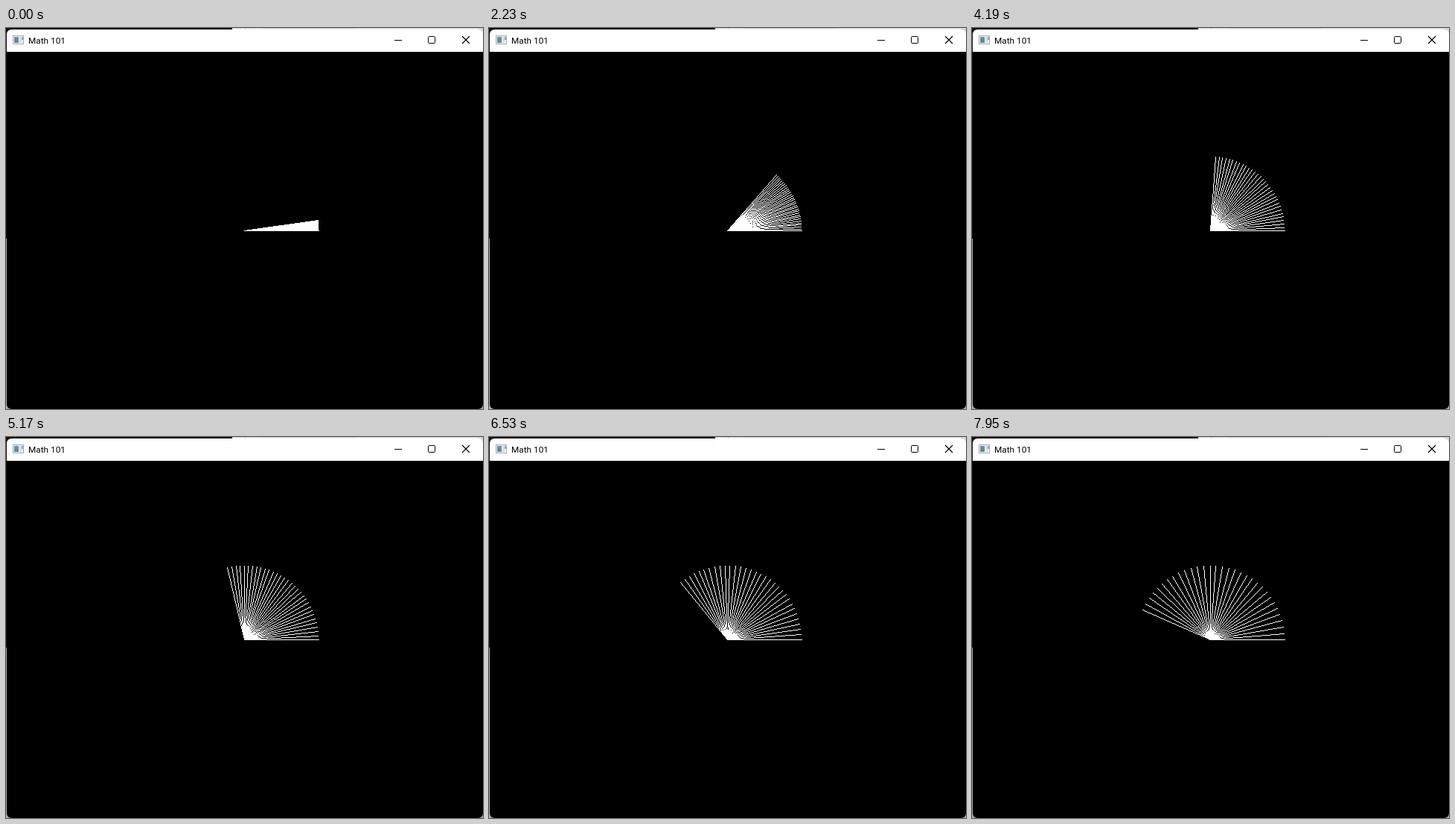
Recreate the animation shown at these times as an HTML page with a canvas. Size 641 px wide and 512 px high, loop 8000 ms.

```html
<!DOCTYPE html>
<html lang="en">
<head>
<meta charset="utf-8">
<title>Math 101</title>
<style>
  html, body { margin: 0; width: 100%; height: 100%; overflow: hidden; background: #000; }
  svg, canvas { position: absolute; left: 0; top: 0; display: block; }
  text { font: 11.8px Roboto, "Open Sans", sans-serif; }
</style>
</head>
<body>
<svg width="641" height="512" viewBox="0 0 641 512">
  <!-- desktop behind the window -->
  <rect width="641" height="512" fill="#111"/>
  <rect x="304" width="337" height="12" fill="#d6d6d6"/>
  <rect x="321" width="1" height="2" fill="#999"/>
  <rect x="344" width="126" height="1" fill="#c8c8c8"/>
  <rect x="304" y="1" width="330" height="1" fill="#f4f4f4"/>
  <rect y="283" width="1" height="229" fill="#a8a8a8"/>
  <rect y="500" width="641" height="12" fill="#b0b0b0"/>

  <!-- window -->
  <path d="M1 32V9Q1 2 8 2H634Q641 2 641 9V32Z" fill="#fff"/>
  <path d="M1 32H641V505Q641 512 634 512H8Q1 512 1 505Z" fill="#000"/>

  <!-- title bar -->
  <rect x="9.500" y="10.500" width="14" height="11" fill="#f4f4f4" stroke="#a5a9ab"/>
  <rect x="11" y="12" width="6" height="8" fill="#5d8f92"/>
  <rect x="11" y="12" width="6" height="3" fill="#6c8fae"/>
  <rect x="18" y="12" width="3" height="8" fill="#dcdcdc"/>
  <rect x="21" y="12" width="2" height="4" fill="#8eaac4"/>
  <text x="30" y="21">Math 101</text>
  <g fill="none" stroke="#000">
    <path d="M522 16.500H532"/>
    <rect x="567.500" y="11.500" width="9" height="9" rx="1"/>
    <path d="M613 11L623 21M623 11L613 21" stroke-width="1.200"/>
  </g>
</svg>
<canvas width="641" height="512"></canvas>
<script>
const LOOP = 8000;
const CENTER = { x: 320, y: 272 };
const RADIUS = 100;
const GAPS = 31;
const START_GAP = 0.257;   // degrees between neighbouring rays
const GAP_SPEED = 0.6;     // degrees per second, in steps of 0.01

// Runs of evenly spaced updates: first ms, last ms, count
const RUNS = [
  [50, 800, 14], [860, 1650, 16], [1710, 2470, 14], [2530, 3290, 14], [3350, 4130, 14],
  [4190, 4970, 14], [5030, 5830, 15], [5890, 6650, 14], [6710, 7470, 14], [7530, 7950, 8]
];
const ticks = [0, ...RUNS.flatMap(([first, last, count]) =>
  Array.from({ length: count }, (_, i) =>
    Math.round((first + (last - first) * i / (count - 1)) / 10) * 10))];

const ctx = document.querySelector("canvas").getContext("2d");
ctx.fillStyle = "#fff";

// Hard-edged one-pixel line from the center
function drawRay(dx, dy) {
  const steps = Math.max(Math.abs(dx), Math.abs(dy));
  for (let i = 0; i <= steps; i++) {
    const x = CENTER.x + Math.round(dx * i / steps);
    const y = CENTER.y + Math.round(dy * i / steps);
    ctx.fillRect(x, y, 1, 1);
  }
}

function drawFan(time) {
  const gap = Math.round((START_GAP + GAP_SPEED * time / 1000) * 100) / 100;
  ctx.clearRect(0, 0, 641, 512);
  for (let i = 0; i <= GAPS; i++) {
    const angle = gap * i * Math.PI / 180;
    drawRay(Math.trunc(RADIUS * Math.cos(angle)), Math.trunc(-RADIUS * Math.sin(angle)));
  }
}

let shown = -1;
const origin = performance.now();

function render() {
  const time = Math.max(0, performance.now() - origin) % LOOP;
  const tick = ticks.findLast(t => t <= time);
  if (tick !== shown) drawFan(shown = tick);
  requestAnimationFrame(render);
}
render();
</script>
</body>
</html>
```
